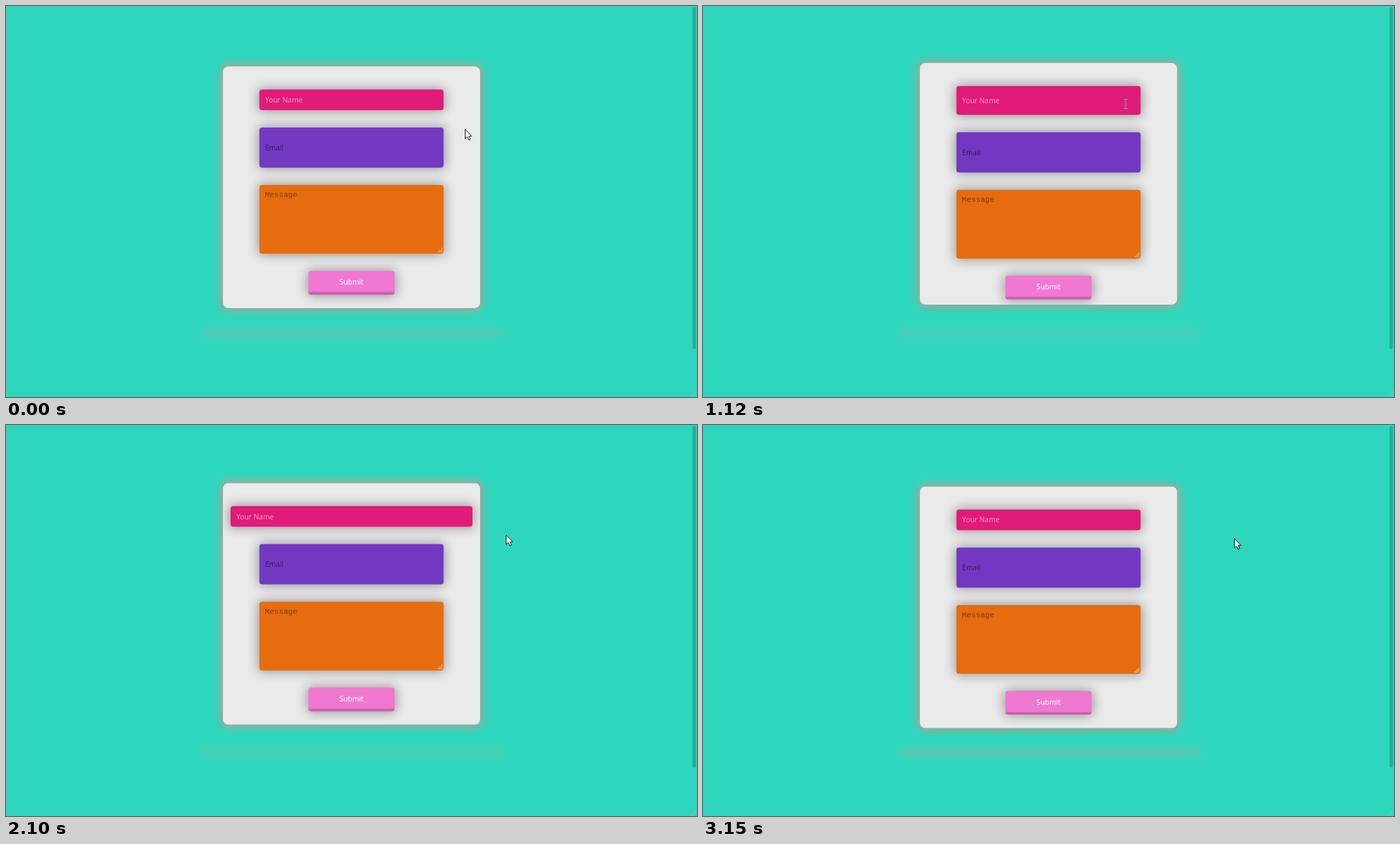
Animation, 994 px wide and 563 px high, one loop 3320 ms. Source, as an HTML page:

```html
<!DOCTYPE html>
<html lang="en">
<head>
<meta charset="utf-8">
<title>Floating contact form</title>
<style>
  html, body { margin: 0; width: 100%; height: 100%; overflow: hidden; background: #2dd7bd; }
  svg { display: block; width: 994px; height: 563px; }
  text { font: 10.3px "Noto Sans", "Open Sans", sans-serif; }
  .mono { font: 11.1px "Liberation Mono", monospace; }
  .glow { fill: #cd9691; stroke: #cd9691; stroke-width: 8; filter: blur(6px); opacity: .75; }
  .shade { stroke: #000; stroke-width: 4; filter: blur(8px); opacity: .34; }
  #ground { fill: #be9b96; filter: blur(4.5px); }
</style>
</head>
<body>
<svg viewBox="0 0 994 563">
  <defs><clipPath id="inner"><rect x="312" width="370" height="348" rx="8"/></clipPath></defs>
  <rect width="994" height="563" fill="#2dd7bd"/>
  <rect x="987.5" y="1.5" width="5" height="492" rx="2.5" fill="#24ac97"/>
  <path d="M986 562L994 554" stroke="#6fc4b4" stroke-width="2"/>
  <rect id="ground" x="281" y="464" width="434" height="14" rx="5"/>
  <g id="card">
    <rect class="glow" x="312" width="370" height="348" rx="8"/>
    <g clip-path="url(#inner)">
      <rect x="312" width="370" height="348" fill="#eaeaea"/>
      <g id="name">
        <rect class="shade" rx="4"/><path class="edge" fill="#b3145f"/><path class="face" fill="#e01b78"/>
        <text fill="#f59ac6">Your Name</text>
      </g>
      <g id="email">
        <rect class="shade" rx="4"/><path class="edge"/><path class="face" fill="#7238c1"/>
        <text fill="#341a5c">Email</text>
      </g>
      <g id="message">
        <rect class="shade" rx="4"/><path class="edge"/><path class="face" fill="#e66c0f"/>
        <text class="mono" fill="#7d3b06">Message</text>
        <path id="grip" stroke="#fbe6d2" stroke-width="1.3"/>
      </g>
      <g id="submit">
        <rect class="shade" rx="4"/><path class="edge" fill="#c860b0"/><path class="face" fill="#f078d2"/>
        <text fill="#fff" text-anchor="middle">Submit</text>
      </g>
    </g>
  </g>
  <path id="arrow" d="M.5.5V14L3.6 11.2 5.8 16 8 15 5.9 10.4H9.8Z" fill="#fff" stroke="#1a1a1a"/>
  <path id="beam" d="M-3-6.5H-.8L0-5.8.8-6.5H3M0-5.8V5.8M-3 6.5H-.8L0 5.8.8 6.5H3" fill="none" stroke="#3fbf9a" stroke-width="1.1"/>
</svg>
<script>
const LOOP = 3320, MID = 497, ENTER = 930, LEAVE = 1960;
const $ = id => document.getElementById(id);

// Eased 0 to 1 between two times
function ramp(t, from, to) {
  const u = Math.min(1, Math.max(0, (t - from) / (to - from)));
  return u * u * (3 - 2 * u);
}

// Rises to 1, then falls back to 0
const pulse = (t, up, top, down, end) => ramp(t, up, top) - ramp(t, down, end);

function set(el, attrs) {
  for (const key in attrs) el.setAttribute(key, attrs[key]);
}

function boxPath(x, y, w, h, b) {
  const r = 4;
  return `M${x} ${y + r}q0-${r} ${r}-${r}h${w - 2 * r}q${r} 0 ${r} ${r}v${h - r - b}`
    + `q0 ${b}-${b} ${b}h${2 * b - w}q-${b} 0-${b}-${b}Z`;
}

function placeBox(id, y, w, h, edge, textX, textY) {
  const x = MID - w / 2, part = s => $(id).querySelector(s);
  set(part('.shade'), { x, y, width: w, height: h + edge });
  set(part('.edge'), { d: edge > 0 ? boxPath(x, y, w, h + edge, 4) : '' });
  set(part('.face'), { d: boxPath(x, y, w, h, Math.max(0, 4 - edge)) });
  set(part('text'), { x: x + textX, y: y + textY });
}

function gripPath(x, y) {
  let d = '';
  for (let row = 0; row < 3; row++)
    for (let col = 0; col <= row; col++) d += `M${x - col * 2.5} ${y - (2 - row) * 2.5}h1.3`;
  return d;
}

function drawCard(t) {
  const sink = pulse(t, -490, 220, 410, 780) + pulse(t, 1090, 1600, 1600, 2340) + ramp(t, 2340, 3080);
  set($('card'), { transform: `translate(0 ${82 + 6.5 * sink})` });
  set($('ground'), { opacity: .17 + .13 * sink });

  const grow = 11.8 * pulse(t, ENTER, ENTER + 110, LEAVE, LEAVE + 110);
  const edge = 3.7 * pulse(t, 1200, 1400, LEAVE, LEAVE + 110);
  const width = 265 + 83 * pulse(t, 1200, 1540, 2110, 2450);
  const height = 29.7 + grow, shift = grow + edge;
  placeBox('name', 33.2, width, height, edge, 8.2, height / 2 + 3.9);
  placeBox('email', 88 + shift, 265, 57.8, 0, 8.2, 32.7);
  placeBox('message', 170.8 + shift, 265, 99, 0, 8, 17.2);
  placeBox('submit', 294.8 + shift, 124, 30, 3.8, 62, 19.2);
  set($('grip'), { d: gripPath(626.2, 267 + shift) });
}

function drawPointer(t) {
  const drift = ramp(t, 400, 660), enter = ramp(t, 780, 1100), rest = ramp(t, 1100, 1600);
  const leave = ramp(t, 1780, 2100), settle = ramp(t, 2100, 2420);
  const x = 660 - 2 * drift - 50 * enter - 4 * rest + 115 * leave + 45 * settle;
  const y = 177 - 36 * enter - 2 * rest + 19 * leave + 5 * settle;
  const inside = t >= ENTER && t < LEAVE, transform = `translate(${x} ${y})`;
  set($('arrow'), { transform, visibility: inside ? 'hidden' : 'visible' });
  set($('beam'), { transform, visibility: inside ? 'visible' : 'hidden' });
}

const start = performance.now();
function tick() {
  const t = (performance.now() - start) % LOOP;
  drawCard(t);
  drawPointer(t);
  requestAnimationFrame(tick);
}
tick();
</script>
</body>
</html>
```
